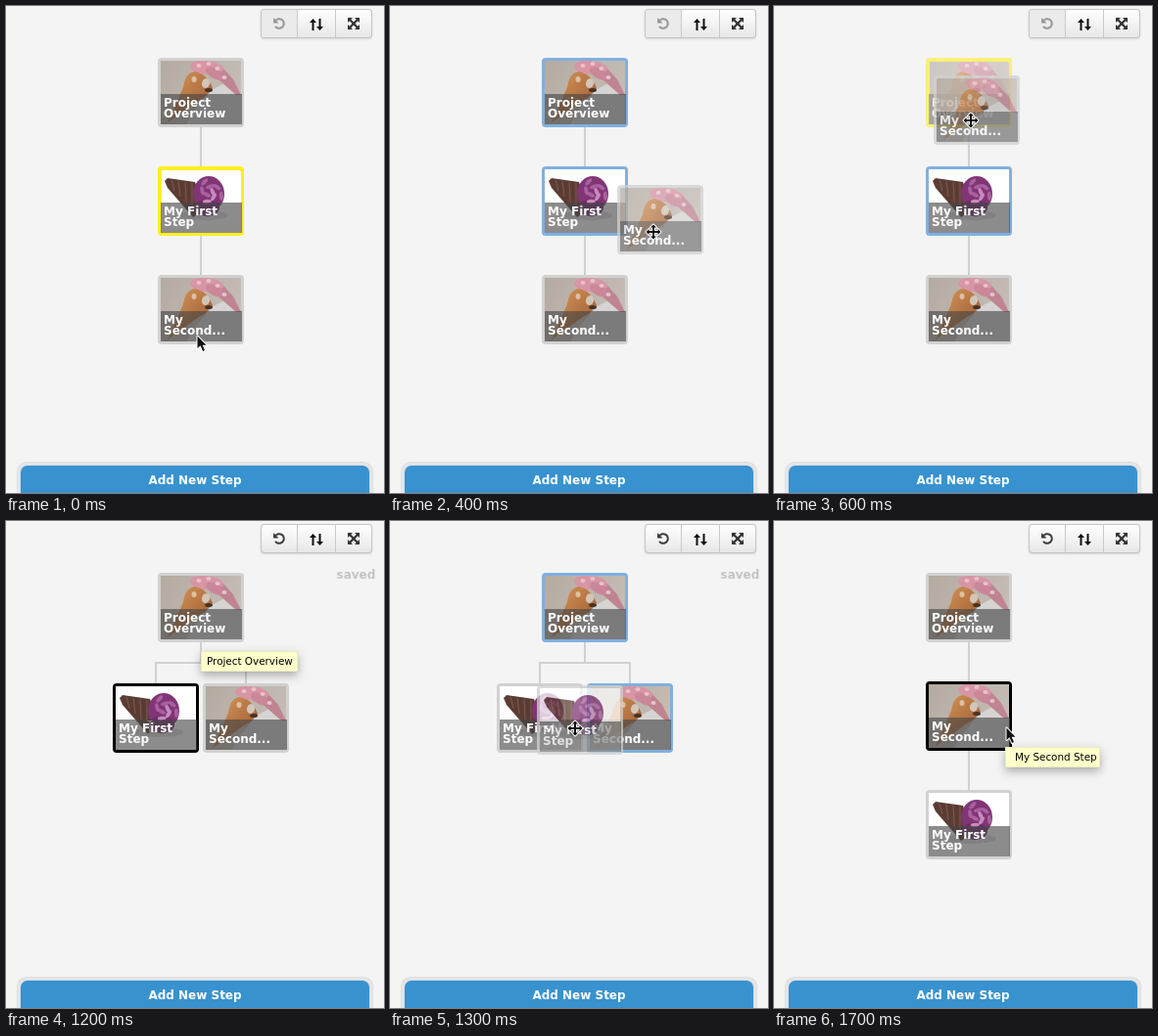
An HTML page with a canvas for the animation above (2300 ms loop, 386 by 498 pixels).

```html
<!DOCTYPE html>
<html lang="en">
<head>
<meta charset="utf-8">
<title>Step tree</title>
<style>
html, body { margin: 0; width: 100%; height: 100%; overflow: hidden; background: #f4f4f4; }
canvas { display: block; }
</style>
</head>
<body>
<canvas id="stage" width="386" height="498"></canvas>
<script>
const stage = document.getElementById('stage').getContext('2d');
const LOOP = 2300;
const TILE = { w: 88, h: 71 };
const layer = new OffscreenCanvas(TILE.w, TILE.h).getContext('2d');
let ctx = stage;

const GREY = '#d1d1d1', BLUE = '#7fb0e0', YELLOW = '#fbef26', BLACK = '#000';
const BOLD = 'bold 12px "DejaVu Sans", Verdana, sans-serif';
const TIP = '10.4px "DejaVu Sans", sans-serif';

const overview = { lines: ['Project', 'Overview'], photo: figurePhoto };
const first = { lines: ['My First', 'Step'], photo: conePhoto };
const second = { lines: ['My', 'Second...'], photo: figurePhoto };

const column = (middle, bottom, edges) => ({
  tiles: [[overview, 155, 53, edges[0]], [middle, 155, 164, edges[1]], [bottom, 155, 275, edges[2]]]
});
const tree = (...edges) => ({
  branch: true, undo: true,
  tiles: [[overview, 155, 53, edges[0]], [first, 109, 166, edges[1]], [second, 201, 166, edges[2]]]
});
const overviewTip = ['Project Overview', 199, 133, 99, 6];

const scenes = [
  { at: 0, ...column(first, second, [GREY, YELLOW, GREY]), cursor: [arrowCursor, 195, 337] },
  { at: 200, ...column(first, second, [BLUE, BLUE, GREY]), ghost: [second, 156, 270], cursor: [moveCursor, 195, 331] },
  { at: 400, ...column(first, second, [BLUE, BLUE, GREY]), ghost: [second, 232, 183], cursor: [moveCursor, 269, 231] },
  { at: 600, ...column(first, second, [YELLOW, BLUE, GREY]), faded: 0, ghost: [second, 163, 71], cursor: [moveCursor, 201, 117] },
  { at: 800, ...tree(BLACK, GREY, GREY), saved: '#e5e5e5', tip: overviewTip, cursor: [beamCursor, 201, 117] },
  { at: 1200, ...tree(GREY, BLACK, GREY), saved: '#c3c3c3', tip: overviewTip, cursor: [beamCursor, 147, 211] },
  { at: 1300, ...tree(BLUE, GREY, BLUE), saved: '#c3c3c3', ghost: [first, 150, 168], cursor: [moveCursor, 189, 212] },
  { at: 1500, ...tree(BLUE, GREY, YELLOW), saved: '#d3d3d3', faded: 2, ghost: [first, 199, 170], cursor: [moveCursor, 238, 214] },
  { at: 1700, ...column(second, first, [GREY, BLACK, GREY]), undo: true, tip: ['My Second Step', 236, 231, 97, 10], cursor: [arrowCursor, 237, 211] }
];

function box(x, y, w, h, r, fill) {
  ctx.beginPath();
  ctx.roundRect(x, y, w, h, r);
  ctx.fillStyle = fill;
  ctx.fill();
}

function poly(points, fill) {
  ctx.beginPath();
  points.forEach(([x, y]) => ctx.lineTo(x, y));
  ctx.closePath();
  ctx.fillStyle = fill;
  ctx.fill();
}

function oval(x, y, rx, ry, fill, angle = 0) {
  ctx.beginPath();
  ctx.ellipse(x, y, rx, ry, angle, 0, Math.PI * 2);
  ctx.fillStyle = fill;
  ctx.fill();
}

function text(string, x, y, fill, font = BOLD, align = 'left') {
  ctx.font = font;
  ctx.textAlign = align;
  ctx.fillStyle = fill;
  ctx.fillText(string, x, y);
}

function shade(x0, y0, x1, y1, from, to) {
  const g = ctx.createLinearGradient(x0, y0, x1, y1);
  g.addColorStop(0, from);
  g.addColorStop(1, to);
  return g;
}

function at(x, y, draw) {
  ctx.save();
  ctx.translate(x, y);
  draw();
  ctx.restore();
}

function figurePhoto() {
  box(0, 0, 88, 71, 0, shade(0, 0, 80, 50, '#b3a99f', '#c6beb7'));
  poly([[34, 58], [55, 33], [70, 25], [88, 42], [88, 71], [28, 71]], '#d6d4d2');
  ctx.beginPath();
  ctx.moveTo(10, 66);
  ctx.lineTo(26, 30);
  ctx.quadraticCurveTo(28, 15, 38, 14);
  ctx.quadraticCurveTo(50, 16, 56, 31);
  ctx.quadraticCurveTo(50, 40, 42, 43);
  ctx.closePath();
  ctx.fillStyle = shade(26, 20, 50, 42, '#cb8a50', '#a7683c');
  ctx.fill();
  poly([[56, 17], [66, 10], [77, 22], [85, 38], [80, 38]], '#bf8492');
  oval(50, 10, 17, 7, '#d795a5', 0.1);
  oval(58, 16, 10, 5, '#c98799', 0.5);
  [[42, 8], [52, 6], [61, 11], [68, 20]].forEach(([x, y]) => oval(x, y, 2.5, 2, '#e6c3c8'));
  oval(49, 26, 4, 5, '#d2c6b9', 0.3);
  oval(37, 22, 2.5, 3, '#dfc0a2');
  oval(52, 33, 4, 2, '#493329');
}

function conePhoto() {
  box(0, 0, 88, 71, 0, '#fff');
  oval(46, 50, 26, 5, '#e4e0e3');
  poly([[7, 15], [10, 12], [38, 16], [48, 44], [36, 52], [10, 22]], '#5b3c35');
  ctx.strokeStyle = '#7d5c4e';
  ctx.lineWidth = 1;
  for (let i = 0; i < 4; i++) {
    ctx.beginPath();
    ctx.moveTo(14 + i * 7, 14 + i);
    ctx.lineTo(17 + i * 6, 25 + i * 6);
    ctx.stroke();
  }
  // Scoop: a dark body with ridges spiralling around its middle.
  oval(52, 28, 16, 18, '#823576');
  oval(50, 42, 13, 9, '#722e6a');
  for (let i = 0; i < 9; i++) {
    const turn = i * 2.4, reach = 3 + i * 1.2;
    oval(53 + reach * Math.cos(turn), 26 + reach * Math.sin(turn), 4.5, 2, i % 3 ? '#a8609f' : '#c58bbd', turn + 1.2);
  }
}

function tile(step, x, y, edge) {
  at(x, y, () => {
    const inset = edge === YELLOW ? 3.5 : 3;
    box(0, 0, TILE.w, TILE.h, 4, edge);
    ctx.save();
    ctx.beginPath();
    ctx.roundRect(inset, inset, TILE.w - 2 * inset, TILE.h - 2 * inset, 1);
    ctx.clip();
    step.photo();
    ctx.restore();
    box(3, 37, 83, 31, 0, 'rgba(70,70,70,.62)');
    step.lines.forEach((line, i) => text(line, 6, 50 + i * 11, '#fff'));
  });
}

// Flattens the tile first, so that its parts do not show through each other.
function translucentTile(alpha, step, x, y, edge) {
  ctx = layer;
  ctx.clearRect(0, 0, TILE.w, TILE.h);
  tile(step, 0, 0, edge);
  ctx = stage;
  ctx.globalAlpha = alpha;
  ctx.drawImage(layer.canvas, x, y);
  ctx.globalAlpha = 1;
}

function links(branch) {
  const bar = (x, y, w, h) => box(x, y, w, h, 0, GREY);
  if (!branch) {
    bar(198, 124, 2, 40);
    bar(198, 235, 2, 40);
    return;
  }
  bar(198, 124, 2, 21);
  bar(152, 144, 94, 2);
  bar(152, 144, 2, 22);
  bar(244, 144, 2, 22);
}

function toolbar(undo) {
  ctx.save();
  ctx.shadowColor = 'rgba(0,0,0,.12)';
  ctx.shadowBlur = 2;
  ctx.shadowOffsetY = 1;
  box(260, 3, 114, 30, 4, '#c6c6c6');
  ctx.restore();
  box(261, 4, 112, 28, 3, shade(0, 4, 0, 32, '#fff', '#e7e7e7'));
  if (!undo) box(261, 4, 36, 28, [3, 0, 0, 3], '#ebebeb');
  box(297, 4, 1, 28, 0, '#c9c9c9');
  box(336, 4, 1, 28, 0, '#c9c9c9');

  const ink = undo ? '#3c3c3c' : '#979797';
  ctx.strokeStyle = ink;
  ctx.lineWidth = 2;
  ctx.beginPath();
  ctx.arc(279, 18, 4.8, Math.PI * 1.18, Math.PI * 2.8);
  ctx.stroke();
  poly([[273, 12], [273, 17.5], [278.5, 17.5]], ink);

  // The sort icon is one arrow and the same arrow turned upside down.
  [[313.5, 1], [320.5, -1]].forEach(([x, dir]) => at(x, 19, () => {
    ctx.scale(1, dir);
    poly([[-3.5, -2], [0, -6], [3.5, -2], [1, -2], [1, 6], [-1, 6], [-1, -2]], '#111');
  }));

  at(355, 18, () => {
    for (let i = 0; i < 4; i++) {
      poly([[-6, -6], [-1, -6], [-2.7, -4.2], [0.8, -0.8], [-0.8, 0.8], [-4.2, -2.7], [-6, -1]], '#333');
      ctx.rotate(Math.PI / 2);
    }
  });
}

function addButton() {
  box(11, 466, 364, 50, 10, '#dedede');
  box(12, 467, 362, 50, 9, '#e6e6e6');
  box(14, 469, 358, 50, 8, '#d5dce1');
  box(15, 470, 356, 50, 7, '#3892cf');
  text('Add New Step', 193, 489, '#fff', BOLD, 'center');
}

function tooltip(label, x, y, w, pad) {
  ctx.save();
  ctx.shadowColor = 'rgba(0,0,0,.3)';
  ctx.shadowBlur = 10;
  ctx.shadowOffsetY = 4;
  box(x, y, w, 21, 0, '#d9d9bb');
  ctx.restore();
  box(x + 0.5, y + 0.5, w - 1, 20, 0, '#ffffcb');
  text(label, x + pad, y + 14, '#000', TIP);
}

function outlined(points) {
  ctx.lineJoin = 'round';
  ctx.lineWidth = 2;
  ctx.strokeStyle = '#fff';
  ctx.beginPath();
  points.forEach(([x, y]) => ctx.lineTo(x, y));
  ctx.closePath();
  ctx.stroke();
  poly(points, '#111');
}

function arrowCursor() {
  outlined([[0.5, 0.5], [0.5, 13], [3.5, 10.3], [6, 16], [8, 15], [5.6, 9.7], [9.5, 9.7]]);
}

function moveCursor() {
  const points = [];
  const arm = [[-1, -1], [-1, -4.5], [-3, -4.5], [0, -7.5], [3, -4.5], [1, -4.5]];
  for (let i = 0; i < 4; i++) {
    const c = [1, 0, -1, 0][i], s = [0, 1, 0, -1][i];
    arm.forEach(([x, y]) => points.push([x * c - y * s, x * s + y * c]));
  }
  outlined(points);
}

function beamCursor() {
  box(-1, -6, 2, 12, 0, '#6c6c6c');
  box(-2.5, -7, 5, 1, 0, '#7c7c7c');
  box(-2.5, 6, 5, 1, 0, '#7c7c7c');
}

function render(time) {
  const scene = scenes.findLast(s => s.at <= time);
  box(0, 0, 386, 498, 0, '#f4f4f4');
  toolbar(scene.undo);
  addButton();
  links(scene.branch);
  scene.tiles.forEach((args, i) => translucentTile(i === scene.faded ? 0.6 : 1, ...args));
  if (scene.ghost) translucentTile(0.75, ...scene.ghost, GREY);
  if (scene.saved) text('saved', 337.5, 59, scene.saved);
  if (scene.tip) tooltip(...scene.tip);
  const [cursor, x, y] = scene.cursor;
  at(x, y, cursor);
}

const start = performance.now();
function frame() {
  render((performance.now() - start) % LOOP);
  requestAnimationFrame(frame);
}
frame();
</script>
</body>
</html>
```
